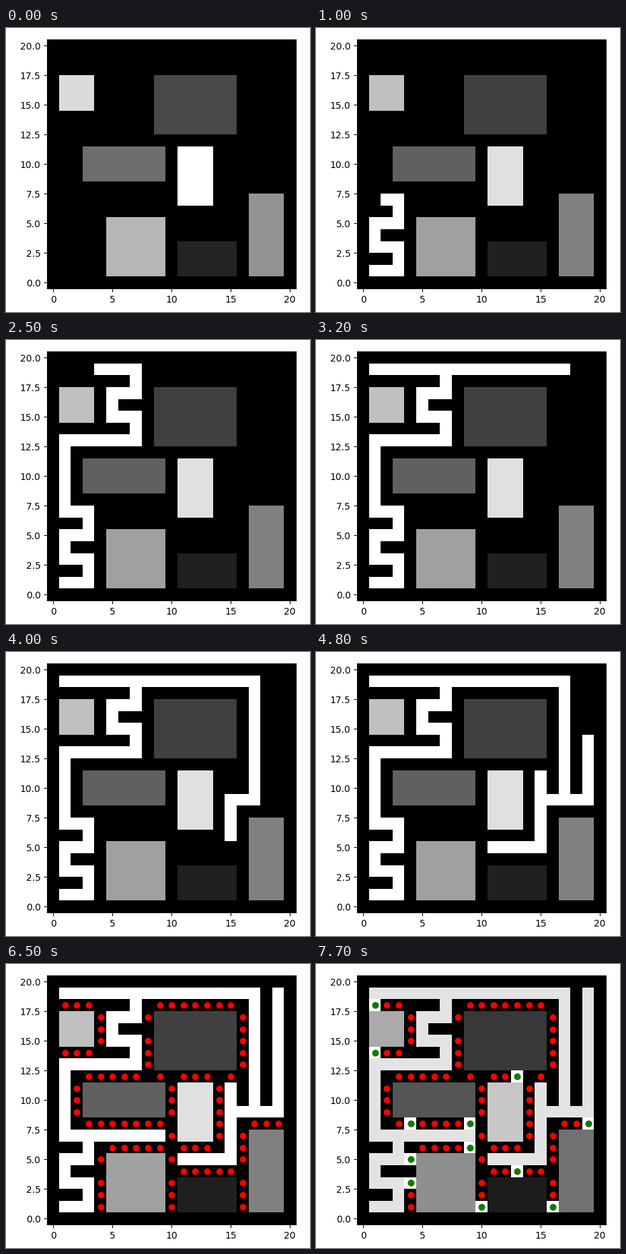
These frames come from a looping animation (452x422 px, 8 s). A matplotlib script:

```python
import numpy as np
import matplotlib.pyplot as plt
from matplotlib.animation import FuncAnimation

W, H, DPI = 452, 422, 100
SIZE = 21
CELL = 17.6
FRAMES, STEP_MS = 80, 100

# x0, y0, x1, y1 (inclusive); the region value is the position in the list + 1
ROOMS = [
    (11, 1, 15, 3), (9, 13, 15, 17), (3, 9, 9, 11), (17, 1, 19, 7),
    (5, 1, 9, 5), (1, 15, 3, 17), (11, 7, 13, 11),
]
MAZE, DOOR = 8, 9

# Corners of each corridor, in the order they are dug
BRANCHES = [
    [(1, 1), (3, 1), (3, 3), (1, 3), (1, 5), (3, 5), (3, 7), (1, 7), (1, 13),
     (7, 13), (7, 15), (5, 15), (5, 17), (7, 17), (7, 19), (1, 19)],
    [(8, 19), (17, 19), (17, 9), (15, 9), (15, 5), (11, 5)],
    [(15, 10), (15, 11)],
    [(18, 9), (19, 9), (19, 19)],
    [(4, 7), (9, 7)],
]
DOORS = [(1, 18), (1, 14), (13, 12), (4, 8), (9, 8), (9, 6),
         (4, 5), (4, 3), (13, 4), (19, 8), (10, 1), (16, 1)]

# Digging pace: cells dug by a given step
PACE_STEP = [0, 9, 18, 22, 27, 36, 37, 45, 52]
PACE_CELLS = [0, 18, 34, 40, 50, 65, 68, 82, 93]
DIG_START, DOTS_AT, DOORS_AT, GREEN_AT = 4, 65, 76, 77


def walk(corners):
    cells = [corners[0]]
    for end in corners[1:]:
        while cells[-1] != end:
            x, y = cells[-1]
            cells.append((x + int(np.sign(end[0] - x)),
                          y + int(np.sign(end[1] - y))))
    return cells


PATH = [cell for branch in BRANCHES for cell in walk(branch)]


def build_grid(dug, doors=False):
    grid = np.zeros((SIZE, SIZE))
    for value, (x0, y0, x1, y1) in enumerate(ROOMS, 1):
        grid[y0:y1 + 1, x0:x1 + 1] = value
    for x, y in PATH[:dug]:
        grid[y, x] = MAZE
    if doors:
        for x, y in DOORS:
            grid[y, x] = DOOR
    return grid


def find_connectors(grid):
    """Wall cells lying between two different regions."""
    found = []
    for y in range(1, SIZE - 1):
        for x in range(1, SIZE - 1):
            pairs = [(grid[y, x - 1], grid[y, x + 1]),
                     (grid[y - 1, x], grid[y + 1, x])]
            if grid[y, x] == 0 and any(a and b and a != b for a, b in pairs):
                found.append((x, y))
    return found


# The small margin keeps the pixel size from being rounded down
fig = plt.figure(figsize=((W + 0.01) / DPI, (H + 0.01) / DPI), dpi=DPI,
                 facecolor="white")
side = SIZE * CELL
left, top = 61.4, 17.5
ax = fig.add_axes([left / W, (H - top - side) / H, side / W, side / H])
image = ax.imshow(build_grid(0), cmap="gray", origin="lower",
                  interpolation="nearest", vmin=0, vmax=len(ROOMS))
ax.set_xticks(np.arange(0, 21, 5))
ax.set_yticks(np.arange(0, 20.1, 2.5))

red, = ax.plot(*zip(*find_connectors(build_grid(len(PATH)))), "o", color="red")
green, = ax.plot(*zip(*DOORS), "o", color="green")
ax.set_xlim(-0.5, SIZE - 0.5)
ax.set_ylim(-0.5, SIZE - 0.5)


def update(frame):
    step = max(0, frame - DIG_START + 1)
    dug = int(round(np.interp(step, PACE_STEP, PACE_CELLS)))
    grid = build_grid(dug, frame >= DOORS_AT)
    image.set_data(grid)
    image.set_clim(0, grid.max())
    red.set_visible(frame >= DOTS_AT)
    green.set_visible(frame >= GREEN_AT)
    return image, red, green


anim = FuncAnimation(fig, update, frames=FRAMES, interval=STEP_MS,
                     init_func=lambda: update(0), repeat=True, repeat_delay=0)
plt.show()
```
